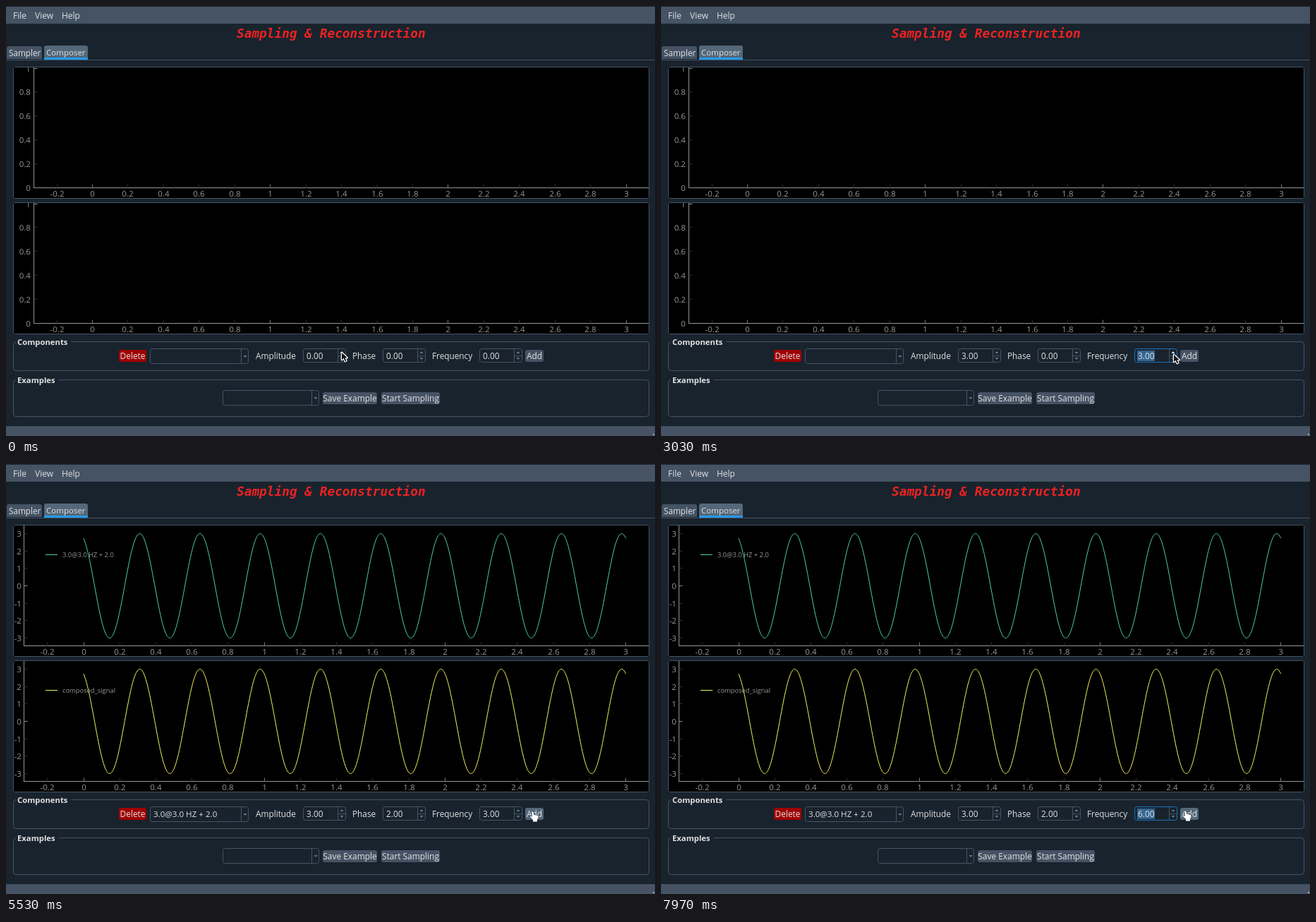
Recreate the animation shown at these times as an HTML page with a canvas. Size 920x609 px, loop 8000 ms.

```html
<!DOCTYPE html>
<html lang="en">
<head>
<meta charset="utf-8">
<title>Sampling &amp; Reconstruction</title>
<style>
html, body { margin: 0; width: 100%; height: 100%; overflow: hidden; background: #19232d; }
canvas { display: block; }
</style>
</head>
<body>
<canvas id="stage" width="920" height="609"></canvas>
<script>
const ctx = document.getElementById('stage').getContext('2d');
const LOOP = 8000, ADD_TIME = 5230;
const SANS = '"Open Sans", "Noto Sans", sans-serif';
const C = {
  bg: '#19232d', bar: '#455364', hover: '#54687a', text: '#e0e1e3', axis: '#969696',
  focus: '#1a72bb', select: '#346792', accent: '#259ae9'
};

// Cursor waypoints: time, x, y
const path = [
  [0, 475, 489], [720, 475, 489], [970, 603, 475], [1250, 680, 480], [1600, 726, 490],
  [2450, 726, 490], [2600, 726, 493], [3380, 726, 492], [3560, 660, 476], [3780, 593, 488],
  [4420, 593, 488], [4640, 680, 475], [4840, 757, 486], [5000, 744, 492],
  [5950, 744, 492], [6350, 725, 490], [7580, 725, 490], [7850, 742, 491], [8000, 741, 491]
];

const spins = [
  { label: 'Amplitude', labelX: 354, x: 421, steps: [[200, 1], [400, 2], [600, 3]], focus: [[200, 1800]] },
  { label: 'Phase', labelX: 491, x: 534, steps: [[3860, 1], [4220, 2]], focus: [[3860, 5180]] },
  { label: 'Frequency', labelX: 604, x: 671,
    steps: [[1850, 1], [2330, 2], [2660, 3], [6800, 4], [7080, 5], [7340, 6]],
    focus: [[1800, 3860], [6800, 8000]] }
];

function text(str, x, y, { size = 12, color = C.text, align = 'left', style = '', family = SANS } = {}) {
  ctx.font = `${style} ${size}px ${family}`;
  ctx.fillStyle = color;
  ctx.textAlign = align;
  ctx.fillText(str, x, y);
}

function fill(x, y, w, h, color, r = 0) {
  ctx.fillStyle = color;
  ctx.beginPath();
  ctx.roundRect(x, y, w, h, r);
  ctx.fill();
}

function outline(x, y, w, h, color = C.bar, r = 3) {
  ctx.strokeStyle = color;
  ctx.lineWidth = 1;
  ctx.beginPath();
  ctx.roundRect(x + .5, y + .5, w - 1, h - 1, r);
  ctx.stroke();
}

function line(x1, y1, x2, y2, color) {
  ctx.strokeStyle = color;
  ctx.lineWidth = 1;
  ctx.beginPath();
  ctx.moveTo(x1, y1);
  ctx.lineTo(x2, y2);
  ctx.stroke();
}

function arrow(x, y, dir, color = '#60798b') {
  ctx.fillStyle = color;
  ctx.beginPath();
  ctx.moveTo(x - 2.5, y - dir);
  ctx.lineTo(x + 2.5, y - dir);
  ctx.lineTo(x, y + dir * 2);
  ctx.fill();
}

function button(label, x, y, w, color = C.bar) {
  fill(x, y, w, 17, color, 3);
  text(label, x + w / 2, y + 13, { align: 'center', size: 11.9 });
}

function combo(x, y, w, value = '') {
  outline(x, y, w, 22);
  line(x + w - 10.5, y + 1, x + w - 10.5, y + 21, C.bar);
  arrow(x + w - 5, y + 11, 1);
  text(value, x + 5, y + 15, { size: 11.6 });
}

function group(title, y, h, gapEnd) {
  outline(10, y, 902, h, C.bar, 4);
  fill(14, y - 1, gapEnd - 14, 3, C.bg);
  text(title, 16, y + 5, { size: 11.3, style: 'bold' });
}

function spinBox({ label, labelX, x, steps, focus }, t, cursor) {
  const value = steps.reduce((v, [at, n]) => t >= at ? n : v, 0);
  const focused = focus.some(([a, b]) => t >= a && t < b);
  const hovered = cursor.x >= x + 49 && cursor.x <= x + 60 && cursor.y > 484;
  text(label, labelX, 500, { size: 11.8 });
  outline(x, 485, 61, 20, focused ? C.focus : C.bar);
  line(x + 49.5, 486, x + 49.5, 504, C.bar);
  line(x + 50, 495.5, x + 60, 495.5, C.bar);
  arrow(x + 55, 491, -1, hovered ? C.text : undefined);
  arrow(x + 55, 499, 1);
  if (focused) fill(x + 4, 488, 25, 15, C.select);
  text(value.toFixed(2), x + 5, 500, { size: 11.8 });
}

function plot(top, composed, color, legend) {
  const left = composed ? 25.5 : 39.5, base = top + 171.5;
  const x0 = composed ? 110 : 122.5, sx = composed ? 256.2 : 252.2;
  const y0 = composed ? top + 86.5 : base, sy = composed ? 24.65 : 169.5;
  const toX = v => x0 + v * sx, toY = v => y0 - v * sy;
  fill(10, top, 902, 187, '#000');
  outline(10, top, 902, 187, C.bar, 2);
  ctx.save();
  ctx.beginPath();
  ctx.rect(11, top + 1, 900, 185);
  ctx.clip();
  line(left, top + 1, left, base + .5, C.axis);
  line(left, base, 911, base, C.axis);
  for (let i = -1; i <= 15; i++) {
    const v = i / 5, x = Math.floor(toX(v)) + .5;
    line(x, base, x, base - 5, i % 5 ? '#2c2c2c' : '#777');
    text(String(v), x, top + 184, { color: C.axis, align: 'center', size: 11.6 });
  }
  for (let i = composed ? -3 : 0; i <= (composed ? 3 : 5); i++) {
    const v = composed ? i : i / 5, y = Math.floor(toY(v)) + .5;
    const major = composed ? i === 0 : i % 5 === 0;
    line(left, y, left + 5, y, major ? '#888' : '#2c2c2c');
    text(String(v), composed ? 22 : 35, y + 4.5, { color: C.axis, align: 'right', size: 11.6 });
  }
  if (composed) {
    ctx.strokeStyle = color;
    ctx.lineWidth = 1;
    ctx.beginPath();
    for (let i = 0; i <= 1000; i++) {
      const v = i * .003;
      ctx.lineTo(toX(v), toY(3 * Math.sin(6 * Math.PI * v + 2)));
    }
    ctx.stroke();
    line(56, top + 42.5, 73, top + 42.5, color);
    text(legend, 80, top + 46, { size: 9.35, color: C.axis });
  }
  ctx.restore();
}

function cursorAt(t) {
  const i = Math.max(1, path.findIndex(p => p[0] > t));
  const [ta, xa, ya] = path[i - 1], [tb, xb, yb] = path[i];
  const u = (t - ta) / (tb - ta), k = u * u * (3 - 2 * u);
  return { x: xa + (xb - xa) * k, y: ya + (yb - ya) * k };
}

function drawCursor({ x, y }, isHand) {
  ctx.save();
  ctx.translate(Math.round(x), Math.round(y));
  ctx.lineJoin = 'round';
  ctx.lineWidth = isHand ? 1.2 : 2.4;
  const shape = new Path2D(isHand
    ? 'M1 1Q2-.5 3.5 1L4.5 5L9 5.5Q11 6 10.5 9L9 12V14.5H3V12L-1 8Q-1 6 2 7.5Z'
    : 'M1 2V12.2L3.6 9.8L5.6 14.2L7.4 13.4L5.5 9.2H8.8Z');
  ctx.fillStyle = isHand ? '#fff' : '#101418';
  ctx.strokeStyle = isHand ? '#222a32' : '#fff';
  ctx.stroke(shape);
  ctx.fill(shape);
  ctx.restore();
}

function draw(t) {
  const cursor = cursorAt(t), composed = t >= ADD_TIME;
  const onAdd = cursor.x >= 736 && cursor.x <= 762 && cursor.y >= 486;
  const signal = '3.0@3.0 HZ + 2.0';

  fill(0, 0, 920, 609, C.bg);
  fill(0, 1, 920, 24, C.bar);
  fill(0, 595, 920, 14, C.bar);
  fill(917, 606, 2, 2, '#9da9b5');
  [['File', 10], ['View', 41], ['Help', 79]].forEach(([s, x]) => text(s, x, 18));
  text('Sampling & Reconstruction', 327, 45, {
    size: 17.8, color: '#ee2222', style: 'italic bold', family: '"DejaVu Sans Mono", monospace'
  });

  line(0, 76.5, 920, 76.5, C.bar);
  fill(1, 57, 50, 18, C.bar, [3, 3, 0, 0]);
  fill(54, 56, 62, 20, C.hover, [3, 3, 0, 0]);
  fill(54, 73, 62, 3, C.accent);
  text('Sampler', 4, 70.5, { size: 11.7 });
  text('Composer', 57, 70, { size: 11.5 });

  plot(86, composed, '#50d0a8', signal);
  plot(278, composed, '#f4f45c', 'composed_signal');

  group('Components', 475, 42, 92);
  button('Delete', 160, 487, 39, '#a00000');
  combo(204, 485, 140, composed ? signal : '');
  spins.forEach(s => spinBox(s, t, cursor));
  button('Add', 736, 487, 26, onAdd ? C.hover : C.bar);

  group('Examples', 529, 53, 75);
  combo(307, 544, 137);
  button('Save Example', 449, 547, 77);
  button('Start Sampling', 532, 547, 83);

  drawCursor(cursor, onAdd);
}

function tick(now) {
  draw(now % LOOP);
  requestAnimationFrame(tick);
}
draw(0);
requestAnimationFrame(tick);
</script>
</body>
</html>
```
